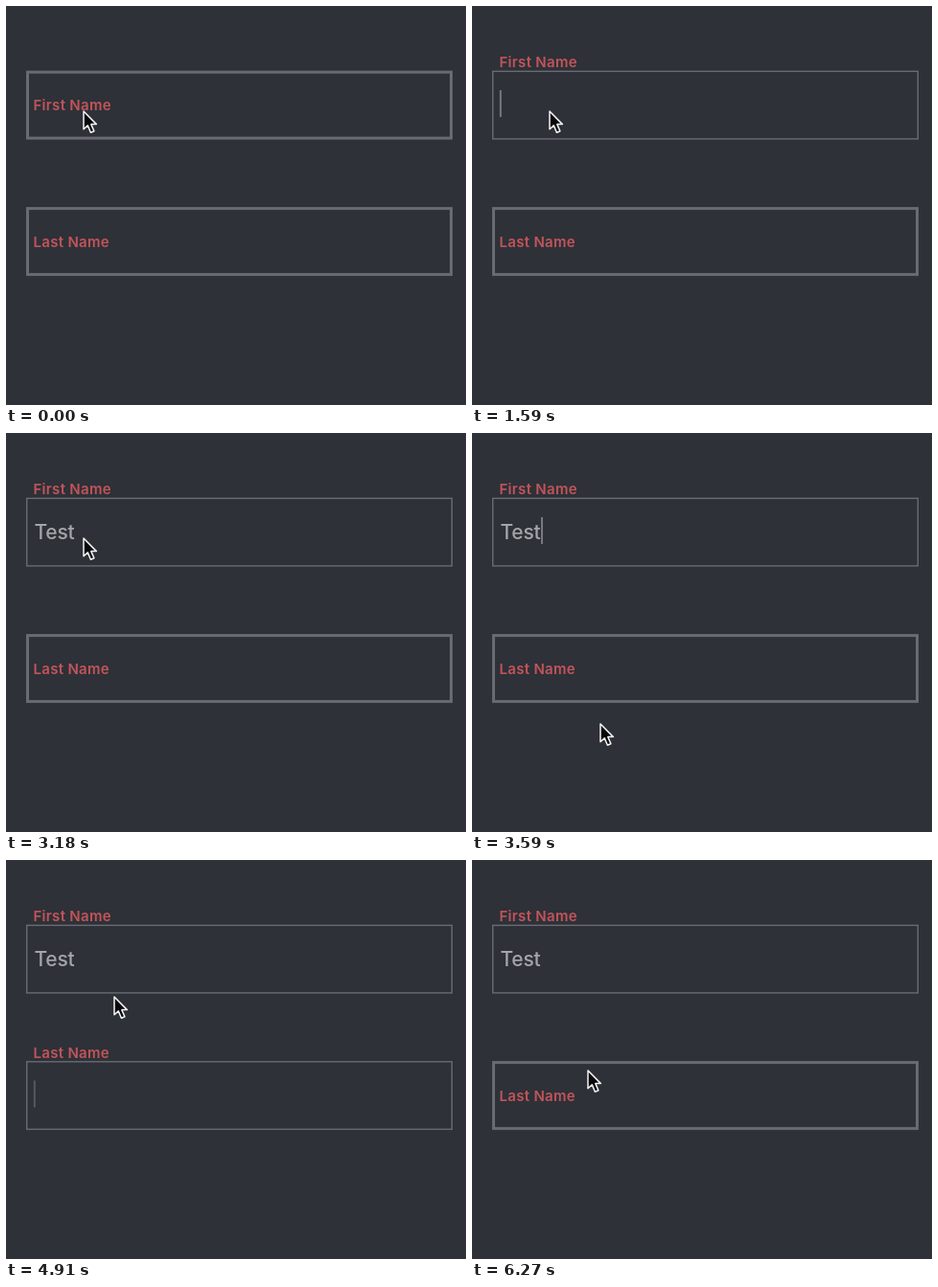
An HTML page that plays this animation: 480 px wide and 417 px high, repeating every 6310 ms.

```html
<!DOCTYPE html>
<html lang="en">
<head>
<meta charset="utf-8">
<title>Floating labels</title>
<style>
  html, body { margin: 0; width: 100%; height: 100%; overflow: hidden; background: #2e3138; }
  svg { display: block; width: 480px; height: 417px; font-family: Inter, "Open Sans", sans-serif; }
  .frame { fill: none; stroke: #686b72; }
  .label { font-size: 15px; font-weight: 600; letter-spacing: .3px; fill: #c2545a; }
  .value { font-size: 21px; font-weight: 500; letter-spacing: -.25px; fill: #a4a5a8; }
  .caret { fill: #77797e; }
</style>
</head>
<body>
<svg viewBox="0 0 480 417">
  <rect width="480" height="417" fill="#2e3138"/>
  <g id="first">
    <rect class="frame"/>
    <text class="label" x="28.5">First Name</text>
  </g>
  <g id="last" transform="translate(0 142.5)">
    <rect class="frame"/>
    <text class="label" x="28.5">Last Name</text>
  </g>
  <rect id="mark" x="25" y="86" width="41" height="31" fill="#393e49"/>
  <text id="value" class="value" x="29.5" y="110.5"></text>
  <rect id="caret" class="caret" width="2" height="28"/>
  <g id="hint">
    <path d="M25 117H78A16.5 16.5 0 0 1 78 150H25Z" fill="#fff"/>
    <text class="value" x="29.5" y="141" style="fill:#1d62bd">Yes</text>
    <path d="M71.5 128.5l9.5 9.5m0-9.5l-9.5 9.5" stroke="#a9abb0" stroke-width="1.3"/>
  </g>
  <g id="pointer">
    <g id="ring" fill="none" stroke="#e4e4e6" stroke-width="1.1">
      <circle cx="0.5" cy="1.5" r="29.2" stroke="#17181b" stroke-width="2.6"/>
      <circle cx="0.5" cy="1.5" r="30.7"/>
      <circle cx="0.5" cy="1.5" r="27.8"/>
    </g>
    <path d="M0 0V18.8L4.3 14.9L7.4 22.3L10.9 20.8L7.8 13.6H13.4Z"
      fill="#08080a" stroke="#f4f4f5" stroke-width="1.5" stroke-linejoin="round"/>
  </g>
</svg>
<script>
const LOOP = 6310;
const $ = id => document.getElementById(id);
const clamp = v => Math.min(1, Math.max(0, v));
const ease = v => v * v * (3 - 2 * v);
const within = (t, a, b) => t >= a && t < b;

// start, end, then the position reached
const moves = [
  [0, 0, 81, 110],
  [3410, 3580, 134, 304],
  [4050, 4190, 113, 262],
  [4740, 4890, 113, 143],
  [4980, 5120, 113, 130],
  [6000, 6250, 121, 220]
];
const clicks = [[240, 450], [4200, 4420], [5370, 5570]];
const typed = [[0, ""], [2060, "T"], [2200, "Te"], [2340, "Tes"], [2600, "Test"]];
const caretX = [28.8, 43, 54, 64, 72];
const FOCUS_FIRST = 540, FOCUS_LAST = 4500, BACK = 5640, FLOAT = 300;

const rise = (t, start) => ease(clamp((t - start) / FLOAT));

function setField(id, lift, thin) {
  const [frame, label] = $(id).children;
  const w = thin ? 1.4 : 3;
  const box = { x: 21 + w / 2, y: 67.6 + w / 2, width: 445 - w, height: 72 - w, "stroke-width": w };
  for (const key in box) frame.setAttribute(key, box[key]);
  label.setAttribute("y", 109.4 - 45 * lift);
}

function pointerAt(t) {
  let [, , x, y] = moves[0];
  for (const [a, b, nx, ny] of moves.slice(1)) {
    const k = ease(clamp((t - a) / (b - a)));
    x += (nx - x) * k;
    y += (ny - y) * k;
  }
  return [x, y];
}

function ringAlpha(t) {
  const hit = clicks.find(([a, b]) => within(t, a, b));
  return hit ? Math.min(clamp((t - hit[0]) / 30), clamp((hit[1] - t) / 80)) : 0;
}

function caretAlpha(t) {
  if (t < FOCUS_FIRST + 200) return 0;
  if (within(t, 2050, 2720)) return 1;
  const p = (t + 600) % 1000;
  return p < 400 ? clamp(p / 80) : 1 - clamp((p - 400) / 250);
}

function draw(t) {
  const inLast = within(t, FOCUS_LAST, BACK);
  setField("first", rise(t, FOCUS_FIRST), t >= FOCUS_FIRST);
  setField("last", rise(t, FOCUS_LAST) - rise(t, BACK), inLast);

  const count = typed.filter(([at]) => t >= at).length - 1;
  $("value").textContent = typed[count][1];
  $("caret").setAttribute("x", caretX[inLast ? 0 : count]);
  $("caret").setAttribute("y", inLast ? 230.5 : 88);
  $("caret").setAttribute("opacity", caretAlpha(t));

  const hinting = within(t, 2390, 2600) ? 1 : 0;
  $("hint").setAttribute("opacity", hinting);
  $("mark").setAttribute("opacity", hinting);

  $("pointer").setAttribute("transform", `translate(${pointerAt(t)})`);
  $("ring").setAttribute("opacity", ringAlpha(t));
}

const began = performance.now();
function tick() {
  draw((performance.now() - began) % LOOP);
  requestAnimationFrame(tick);
}
tick();
</script>
</body>
</html>
```
